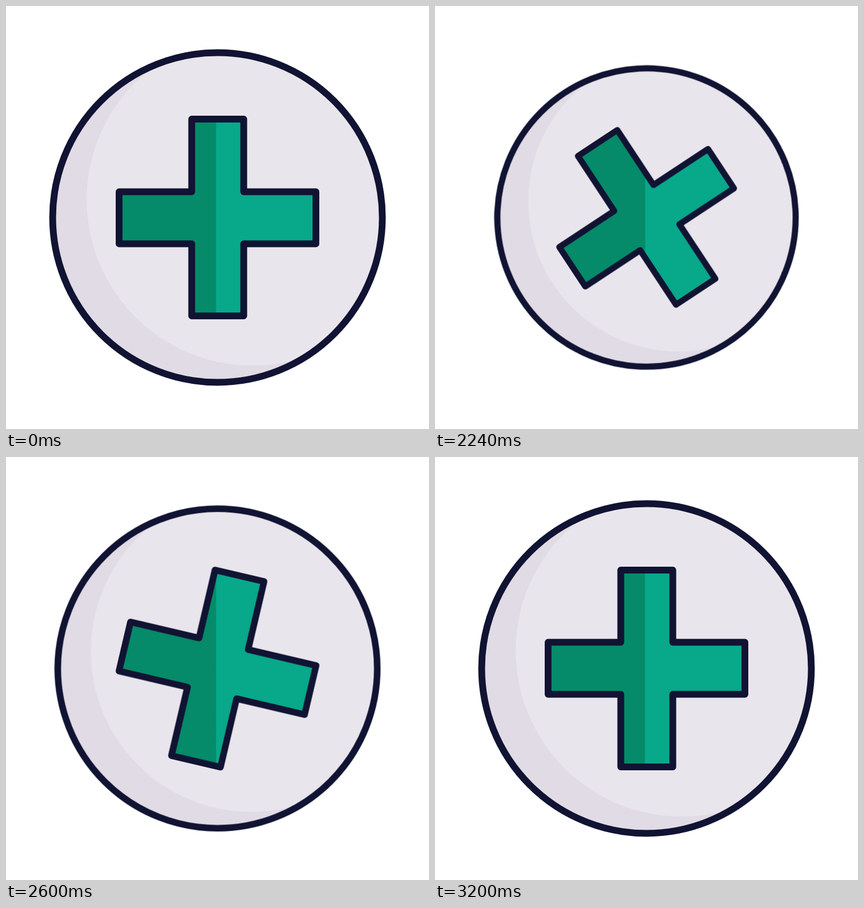
Animation of 748x748 px, one loop 3230 ms. Source, as an HTML page without scripts:

```html
<!DOCTYPE html>
<html lang="en">
<head>
<meta charset="utf-8">
<title>Medical cross</title>
<style>
  html, body { margin: 0; width: 100%; height: 100%; overflow: hidden; background: #fff; }
  svg { display: block; width: 100%; height: 100%; }

  .badge, .spin, .unspin {
    transform-origin: 374px 374px;
    animation: 3230ms linear infinite;
  }
  .badge { animation-name: pulse; }
  .spin { --turn: -90deg; animation-name: turn; }
  .unspin { --turn: 90deg; animation-name: turn; }

  /* rest until 2000 ms, shrink until 2180 ms, settle by 3200 ms */
  @keyframes pulse {
    0% { transform: scale(1); }
    61.92% { transform: scale(1); animation-timing-function: cubic-bezier(.33, 0, .67, 1); }
    67.492% { transform: scale(.9); animation-timing-function: cubic-bezier(.148, 0, .282, 1); }
    99.071%, 100% { transform: scale(1); }
  }
  @keyframes turn {
    0% { transform: rotate(0deg); }
    61.92% { transform: rotate(0deg); animation-timing-function: cubic-bezier(.253, 0, .074, 1); }
    99.071%, 100% { transform: rotate(var(--turn)); }
  }

  .outline { fill: none; stroke: #111333; stroke-width: 12; stroke-linejoin: round; }
</style>
</head>
<body>
<svg viewBox="0 0 748 748">
  <defs>
    <path id="cross" d="M328.4 200h92v128.5h127.6v92h-127.6v127.5h-92v-127.5h-128.4v-92h128.4z"/>
    <clipPath id="cross-clip"><use href="#cross"/></clipPath>
    <clipPath id="disc-clip"><circle cx="374" cy="374" r="291.5"/></clipPath>
  </defs>
  <g class="badge">
    <g clip-path="url(#disc-clip)">
      <rect width="748" height="748" fill="#e0dbe5"/>
      <circle cx="436" cy="342.5" r="293.3" fill="#e9e5ec"/>
    </g>
    <circle class="outline" cx="374" cy="374" r="291.5"/>
    <g class="spin">
      <g clip-path="url(#cross-clip)">
        <!-- the two-tone split stays upright while the cross turns -->
        <g class="unspin">
          <rect width="748" height="748" fill="#058b69"/>
          <rect x="371.4" width="377" height="748" fill="#08a88a"/>
        </g>
      </g>
      <use class="outline" href="#cross"/>
    </g>
  </g>
</svg>
</body>
</html>
```
